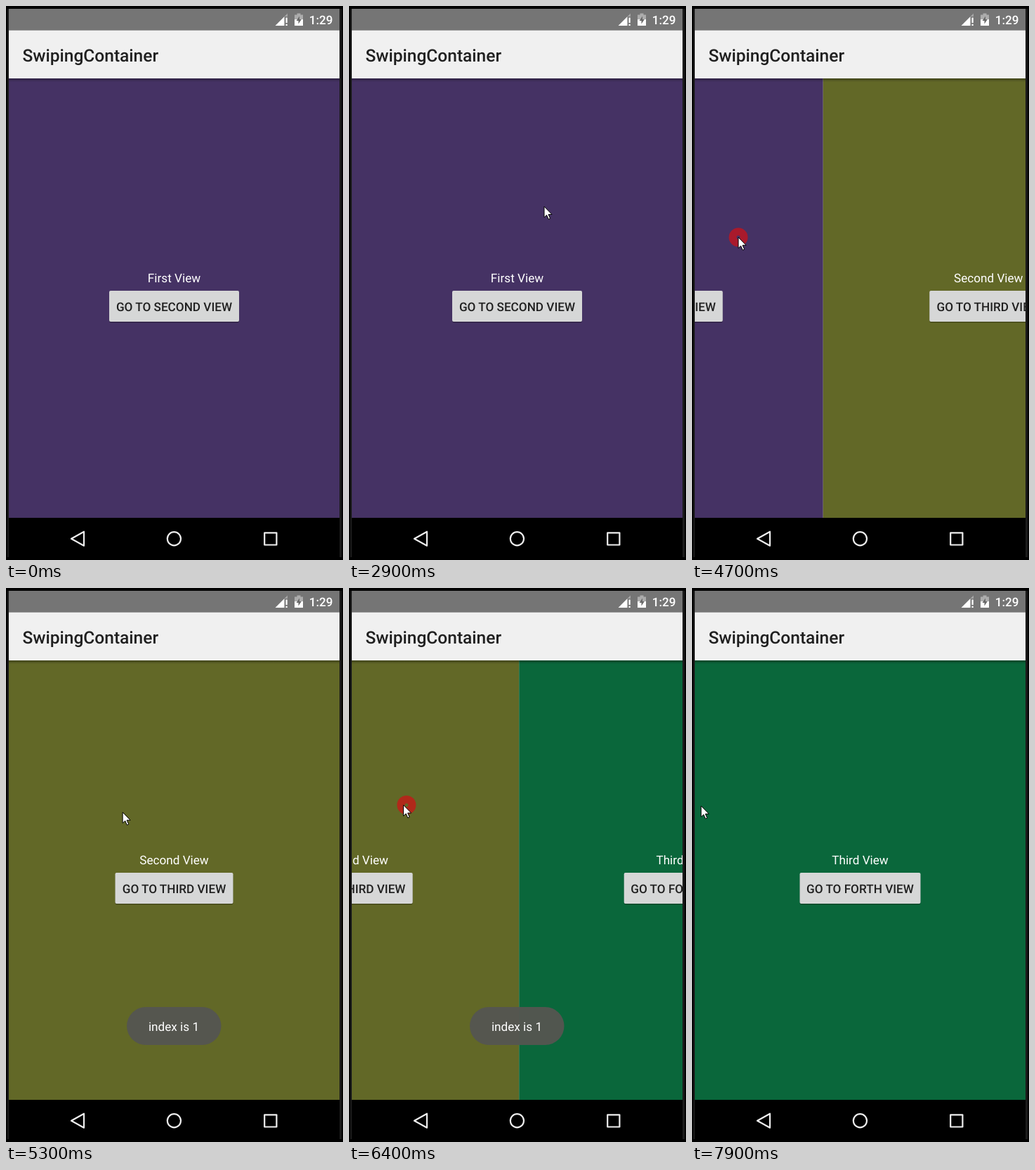
These frames come from a looping animation (480 by 788 pixels, 8 s). An HTML page:

```html
<!DOCTYPE html>
<html lang="en">
<head>
<meta charset="utf-8">
<title>Swiping container</title>
<style>
  html, body { margin: 0; width: 100%; height: 100%; overflow: hidden; background: #000; }
  svg { display: block; width: 480px; height: 788px; }
  text { font: 17.17px Roboto, sans-serif; fill: #fff; text-rendering: geometricPrecision; }
  .mid { text-anchor: middle; }
  .medium { font-weight: 500; }
  .dark { fill: #202020; }
  .title { font-size: 24.5px; }
  .nav { fill: none; stroke: #eee; stroke-width: 2.2; stroke-linejoin: round; }
</style>
</head>
<body>
<svg viewBox="0 0 480 788">
  <defs>
    <clipPath id="content"><rect x="4" y="103" width="471" height="625"/></clipPath>
    <linearGradient id="shade" x2="0" y2="1">
      <stop stop-opacity=".36"/><stop offset="1" stop-opacity="0"/>
    </linearGradient>
  </defs>
  <rect width="480" height="788"/>
  <path d="M2 4h2v780h-2zM475 4h3v780h-3z" fill="#1b1b1b"/>

  <g clip-path="url(#content)">
    <rect x="4" y="103" width="471" height="625" fill="#eee"/>
    <g id="pages"></g>
    <rect x="4" y="103" width="471" height="5" fill="url(#shade)"/>
  </g>

  <g id="toast">
    <rect x="172" y="596" width="134.5" height="54" rx="27" fill="#555651" opacity=".96"/>
    <text class="mid" x="239" y="630">index is 1</text>
  </g>

  <rect x="4" y="4" width="471" height="31" fill="#757575"/>
  <path d="M383.5 28L396.5 15V28Z" fill="#fff"/>
  <path d="M396.5 15L401 10.5V15Z" fill="#fff" opacity=".35"/>
  <path d="M398.5 16.5h2.2v7.5h-2.2zM398.5 25.8h2.2v2.2h-2.2z" fill="#fff"/>
  <path d="M411 12.5h3.5v-2h5v2h3.5v6.5h-12z" fill="#fff" opacity=".4"/>
  <path d="M411 19h12v9h-12z" fill="#fff"/>
  <path d="M418 14.5l-4.5 6.5h3v4.5l4.3-6.5h-2.8z" fill="#686868"/>
  <text class="medium" x="431.8" y="26">1:29</text>

  <rect x="4" y="34.7" width="471" height="68.3" fill="#f0f0f0"/>
  <text class="title medium dark" x="23.5" y="79">SwipingContainer</text>

  <g class="nav">
    <path d="M93 757.7L111 747.7V767.7Z"/>
    <circle cx="239.4" cy="757.8" r="9.6"/>
    <rect x="368.2" y="749.3" width="17.2" height="17.2"/>
  </g>

  <circle id="touch" r="8" fill="none" stroke="#d01016" stroke-width="11" opacity=".72"/>
  <path id="cursor" d="M0 0V15.5L3.6 12.2L6.2 18.2L8.6 17.1L6 11.3H11Z" fill="#fff" stroke="#000"/>
</svg>
<script>
const $ = id => document.getElementById(id);
const WIDTH = 471, LOOP = 8000, STEP = 100, SNAP = 150;

const views = [
  { label: 'First View', action: 'GO TO SECOND VIEW', w: 185, color: '#453264' },
  { label: 'Second View', action: 'GO TO THIRD VIEW', w: 168, color: '#626827' },
  { label: 'Third View', action: 'GO TO FORTH VIEW', w: 172, color: '#0a673b' },
];
$('pages').innerHTML = views.map(({ label, action, w, color }, i) => `
  <g transform="translate(${i * WIDTH})">
    <rect x="4" y="103" width="${WIDTH}" height="625" fill="${color}"/>
    <text class="mid" x="239.5" y="393">${label}</text>
    <rect x="${239.5 - w / 2}" y="406.5" width="${w}" height="44" rx="2.5" opacity=".3"/>
    <rect x="${239.5 - w / 2}" y="405" width="${w}" height="44" rx="2" fill="#d6d7d7"/>
    <text class="mid medium dark" x="239.5" y="434">${action}</text>
  </g>`).join('');

// The cursor travels on curves between drags; a drag pulls the pages,
// which follow after a lag and snap to a page on release.
const entry = { x: 424, y: 107 };
const moves = [
  { start: 400, end: 1100, to: { x: 172, y: 280 }, bend: { x: 262, y: 256 } },
  { start: 1290, end: 2330, to: { x: 280, y: 280 }, pull: 20, lag: 100, release: 2350, page: 0 },
  { start: 2850, end: 3550, to: { x: 354, y: 289 }, bend: { x: 210, y: 460 } },
  { start: 3650, end: 4700, to: { x: 66, y: 329 }, pull: -288.5, lag: 100, release: 4950, page: 1 },
  { start: 5000, end: 5700, to: { x: 321, y: 304 }, bend: { x: 193, y: 316 } },
  { start: 5835, end: 7227, to: { x: 13, y: 310 }, pull: -308, lag: 43, release: 7750, page: 2 },
];
const drags = moves.filter(m => m.pull);

const clamp = p => Math.min(1, Math.max(0, p));
const mix = (a, b, p) => a + (b - a) * p;
const easeOut = p => 1 - (1 - clamp(p)) ** 3;
const smooth = p => clamp(p) ** 2 * (3 - 2 * clamp(p));
const progress = (m, t) => (t - m.start) / (m.end - m.start);
const between = (a, b, p) => ({ x: mix(a.x, b.x, p), y: mix(a.y, b.y, p) });

function pointer(t) {
  let from = entry;
  for (const m of moves) {
    if (t < m.start) break;
    if (m.bend) {
      const p = smooth(progress(m, t));
      from = between(between(from, m.bend, p), between(m.bend, m.to, p), p);
    } else {
      from = between(from, m.to, easeOut(progress(m, t)));
    }
  }
  return from;
}

function scroll(t) {
  let x = 0;
  for (const d of drags) {
    x += d.pull * easeOut(progress(d, t - d.lag));
    if (t < d.release) break;
    x = mix(x, -d.page * WIDTH, easeOut((t - d.release) / SNAP));
  }
  return x;
}

const move = (id, { x, y }) => $(id).setAttribute('transform', `translate(${x} ${y})`);
const show = (id, opacity) => $(id).style.opacity = opacity;

function draw(now) {
  const t = Math.floor(now % LOOP / STEP) * STEP;
  const drag = drags.find(d => t >= d.start && t < d.release);
  move('pages', { x: scroll(t), y: 0 });
  move('cursor', pointer(t));
  show('cursor', t < entryTime ? 0 : 1);
  if (drag) move('touch', pointer(t - drag.lag * .42));
  show('touch', drag ? .72 : 0);
  show('toast', clamp((t - 5050) / 250) * clamp((7450 - t) / 300));
}

const entryTime = moves[0].start;
const began = performance.now();
function tick() {
  draw(performance.now() - began);
  requestAnimationFrame(tick);
}
tick();
</script>
</body>
</html>
```
